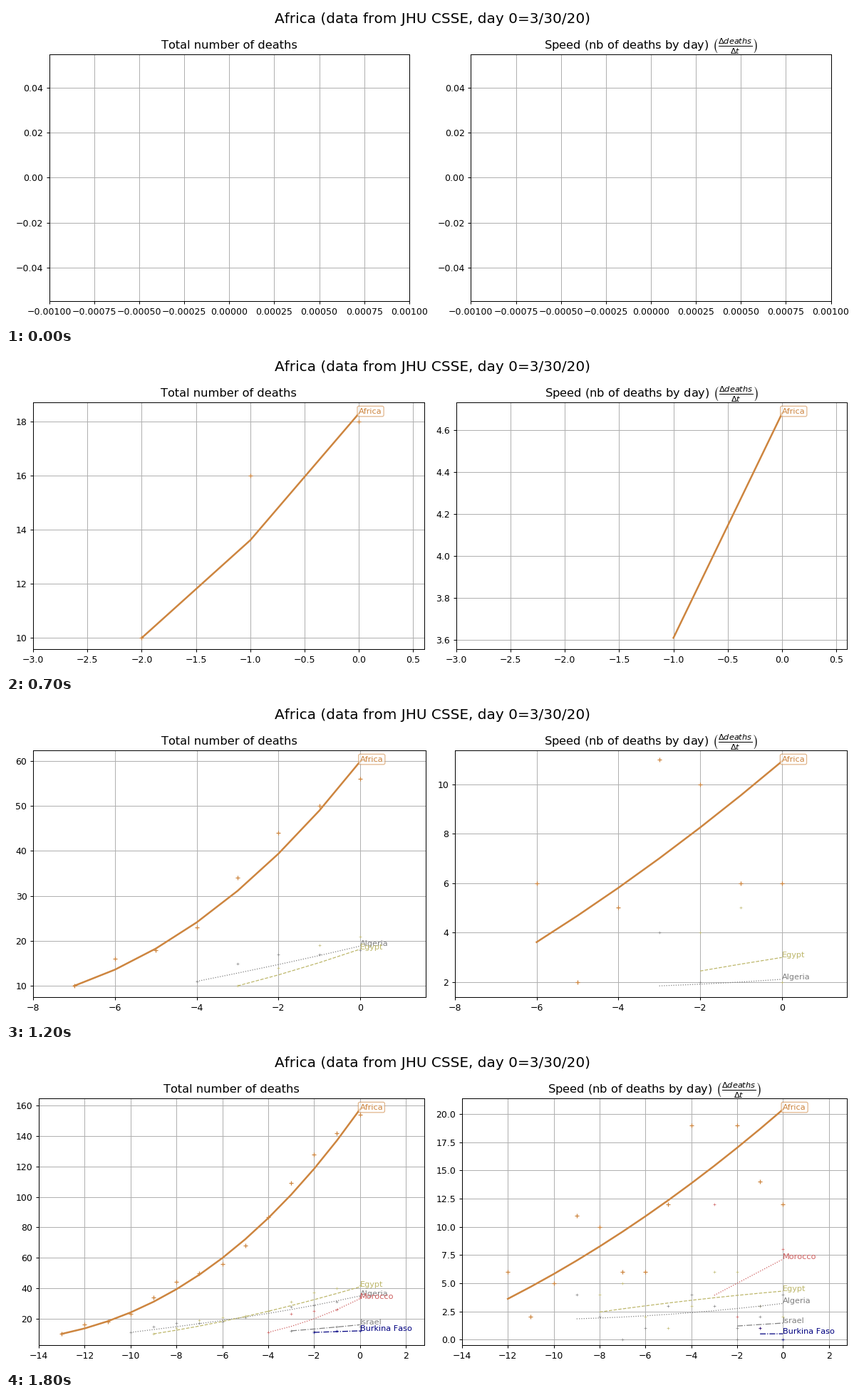
Write a matplotlib script that moves like this. It is 1197 by 450 pixels and loops after 4800 ms.

```python
import matplotlib.pyplot as plt
import numpy as np
from matplotlib.animation import FuncAnimation
from matplotlib.patches import Rectangle

W, H, DPI = 1197, 450, 90
STEP = 100            # ms per frame
HOLD = 5              # frames with empty axes
LAST = 13             # last day
FRAMES = 48
BOTTOM, TOP = 35, 382.2
PAD, MIN_OVERHANG = 13.5, 3.1

plt.rcParams.update({
    "font.family": "DejaVu Sans",
    "font.size": 10,
    "text.kerning_factor": 6,
})


class Series:
    """Smoothed curve with quadratic speed; counts swing around it by wave(k)."""

    def __init__(self, name, color, style, start, first, speed, wave):
        self.name, self.color, self.style, self.start = name, color, style, start
        self.main = start == 0
        k = np.arange(1, LAST - start + 1)
        self.speed = np.polyval(speed, k)
        self.daily = np.round(self.speed + wave(k))
        self.total = first + np.append(0, np.cumsum(self.speed))
        self.counts = first + np.append(0, np.cumsum(self.daily))


SERIES = [
    Series("Africa", "peru", "-", 0, 10, (0.03, 0.98, 2.6),
           lambda k: 2.2 * np.sqrt(k) * np.cos(6 * (np.sqrt(k) - 1))),
    Series("Algeria", "gray", ":", 3, 11, (0.0104, 0.037, 1.79),
           lambda k: 2 * np.cos(1.3 * (k - 1))),
    Series("Egypt", "darkkhaki", "--", 4, 10, (-0.007, 0.302, 2.145),
           lambda k: 2.5 * np.cos(1.28 * (k - 1.55))),
    Series("Morocco", "indianred", ":", 9, 11, (1.07, 2.85),
           lambda k: 4 * (k - 2.8) ** 2 - 5.2),
    Series("Israel", "gray", "-.", 10, 12, (0.13, 1.07),
           lambda k: 1.2 * np.cos(np.pi * k)),
    Series("Burkina Faso", "navy", "-.", 11, 11, (0.01, 0.49),
           lambda k: -0.3 * np.cos(np.pi * k)),
]

TITLES = (
    "Total number of deaths",
    r"Speed (nb of deaths by day) "
    r"$\left(\frac{\Delta deaths}{\Delta t}\right)$",
)

fig = plt.figure(figsize=(W / DPI, H / DPI), dpi=DPI, facecolor="white")
axes = [fig.add_axes([x, BOTTOM / H, 0.4, (TOP - BOTTOM) / H])
        for x in (0.05, 0.55)]
fig.suptitle("Africa (data from JHU CSSE, day 0=3/30/20)", fontsize=16)
backdrop = fig.add_artist(Rectangle((0, 0), 1, 1, transform=fig.transFigure,
                                    lw=0, zorder=-5))


def y_limits(values):
    lo, hi = (min(values), max(values)) if len(values) else (0, 0)
    if hi - lo < 1e-9:
        d = 0.05 * abs(lo) or 0.05
        lo, hi = lo - d, hi + d
    m = 0.05 * (hi - lo)
    return lo - m, hi + m


def draw_series(ax, s, curve, marks, dark):
    """Plot one series so that its newest value sits at x = 0."""
    n = len(curve)
    days = np.arange(1 - n, 1)
    ax.plot(days, curve, s.style, color=s.color, lw=2 if s.main else 1)
    ax.plot(days, marks, "+", color=s.color, ms=5 if s.main else 2.5,
            mew=1 if s.main else 0.5)
    box = None
    if s.main:
        box = dict(boxstyle="round,pad=0.2", alpha=0.6,
                   fc="#575757" if dark else "white",
                   ec="#202020" if dark else s.color)
    ax.text(0, curve[-1] if n else 0, s.name, fontsize=9, bbox=box,
            color="#1c1c1c" if dark else s.color)


def place_axes():
    """Fit both axes to the widths of their tick labels."""
    left, mid = [ax.bbox.x0 - ax.yaxis.get_tightbbox().x0 for ax in axes]
    over = [max(MIN_OVERHANG, ax.xaxis.get_tightbbox().x1 - ax.bbox.x1)
            for ax in axes]
    x0 = PAD + left
    gap = over[0] + PAD + mid
    width = (W - PAD - over[1] - x0 - gap) / 2
    for ax, x in zip(axes, (x0, x0 + width + gap)):
        ax.set_position([x / W, BOTTOM / H, width / W, (TOP - BOTTOM) / H])


def draw(frame):
    day = min(frame - HOLD, LAST)
    dark = day == 0
    paper = "#575757" if dark else "white"
    backdrop.set_facecolor(paper)
    active = [s for s in SERIES if s.start <= day]

    for i, ax in enumerate(axes):
        ax.clear()
        ax.set_facecolor(paper)
        ax.set_axisbelow(True)
        ax.grid(True, color="#2b2b2b" if dark else "#b0b0b0")
        ax.set_title(TITLES[i], fontsize=13, y=1.0, pad=6)
        seen = []
        for s in active:
            n = day - s.start
            if i == 0:
                curve, marks = s.total[:n + 1], s.counts[:n + 1]
            else:
                curve, marks = s.speed[:n], s.daily[:n]
            draw_series(ax, s, curve, marks, dark)
            seen.extend(curve)
        if day < 0:
            ax.set_xlim(-0.001, 0.001)
        else:
            ax.set_xlim(-(day + 1), 0.2 * (day + 1))
        ax.set_ylim(*y_limits(seen))
    place_axes()
    return axes


anim = FuncAnimation(fig, draw, frames=FRAMES, interval=STEP,
                     init_func=lambda: draw(0), repeat=True, repeat_delay=0,
                     blit=False, cache_frame_data=False)
plt.show()
```
